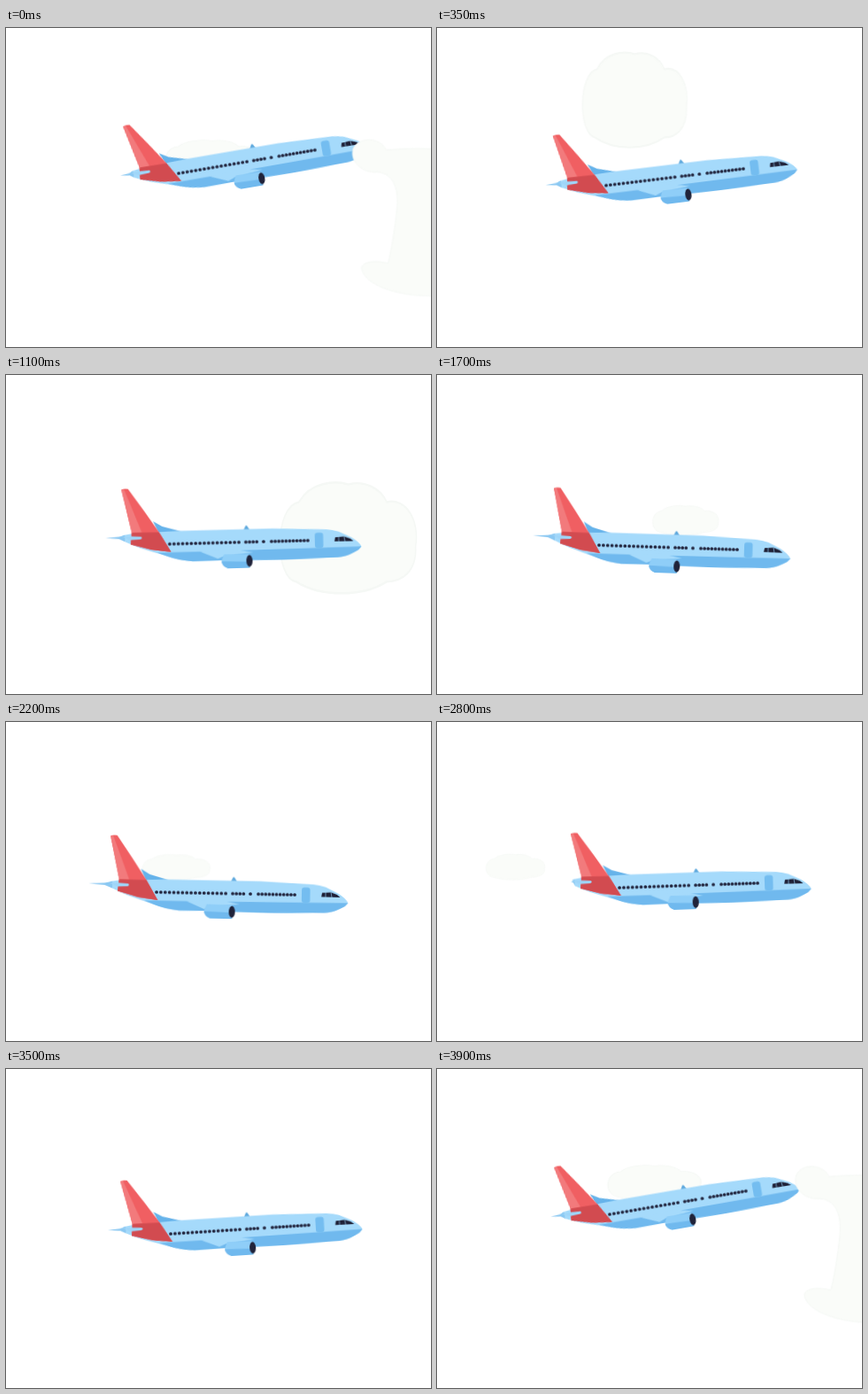
An HTML page that plays this animation: 480 px wide and 360 px high, repeating every 3.95 s.

```html
<!DOCTYPE html>
<html lang="en">
<head>
<meta charset="utf-8">
<title>Airliner in the clouds</title>
<style>
html, body { margin: 0; width: 100%; height: 100%; overflow: hidden; background: #fff; }
svg { display: block; width: 100vw; height: 100vh; }

.move { animation: 3.95s linear infinite; transform-origin: 0 0; }
.cloud { fill: #fafcf9; stroke: #f5f8f5; stroke-width: 1; }
.cloud * { vector-effect: non-scaling-stroke; }

/* The plane turns about its first passenger window. */
#plane { animation-name: fly; }
@keyframes fly {
  0%     { transform: translate(195px, 164px) rotate(-9.7deg); animation-timing-function: ease-in-out; }
  16.46% { transform: translate(188px, 188px) rotate(-4.8deg); }
  29.11% { transform: translate(184.5px, 191px) rotate(-1.1deg); animation-timing-function: ease-out; }
  43.04% { transform: translate(183px, 192px) rotate(1.85deg); animation-timing-function: ease-in-out; }
  55.7%  { transform: translate(170px, 192px) rotate(1.1deg); animation-timing-function: ease-in; }
  69.62% { transform: translate(196.5px, 187.5px) rotate(-1.5deg); }
  70.89% { transform: translate(206px, 187px) rotate(-1.9deg); animation-timing-function: ease-out; }
  77.22% { transform: translate(224px, 186.5px) rotate(-2.4deg); animation-timing-function: ease-in-out; }
  88.61% { transform: translate(186px, 186px) rotate(-3.6deg); animation-timing-function: ease-in-out; }
  98.73%, 100% { transform: translate(195px, 164px) rotate(-9.7deg); }
}

/* The near engine shifts a little against the fuselage. */
#engine { animation-name: engine; }
@keyframes engine {
  0%     { transform: translate(3px, .3px); }
  16.46% { transform: translate(2px, .3px); }
  43.04% { transform: translate(0, 0); }
  55.7%  { transform: translate(-3px, -.5px); }
  70.89% { transform: translate(-3px, -2px); }
  88.61%, 100% { transform: translate(3px, .3px); }
}

#spike { animation-name: spike; }
@keyframes spike {
  0%     { transform: translateX(-50px) scaleX(.62); }
  16.46% { transform: translateX(-50px) scaleX(.8); }
  43.04% { transform: translateX(-50px) scaleX(1); }
  55.7%  { transform: translateX(-50px) scaleX(1.08); }
  70.89% { transform: translateX(-50px) scaleX(.18); }
  88.61% { transform: translateX(-50px) scaleX(.83); }
  100%   { transform: translateX(-50px) scaleX(.62); }
}

#bank { animation-name: bank; }
@keyframes bank {
  0%     { transform: translate(480px, 215px) scale(1); }
  6.33%  { transform: translate(320px, 90px) scale(.7); visibility: visible; }
  6.34%, 91.13% { transform: translate(640px, 60px) scale(1); visibility: hidden; }
  91.14% { transform: translate(590px, 120px) scale(1); visibility: visible; }
  98.73% { transform: translate(493px, 198px) scale(1); }
  100%   { transform: translate(480px, 215px) scale(1); }
}

#puff { animation-name: puff; }
@keyframes puff {
  0%, 6.33% { transform: translate(320px, 90px) scale(0); }
  6.34%  { transform: translate(300px, 80px) scale(1.25, 2.3); }
  12.66% { transform: translate(110px, 82px) scale(1.1, 1.9); }
  15.19% { transform: translate(128px, 107px) scale(.72, .92); }
  16.46% { transform: translate(129px, 107px) scale(.5, .72); }
  18.99%, 100% { transform: translate(129px, 107px) scale(0); }
}

#haze { animation-name: haze; }
@keyframes haze {
  0%     { transform: translate(233px, 146px) scale(1.06, .8); }
  2.53%  { transform: translate(209px, 180px) scale(.8, .6); }
  3.8%, 94.93% { transform: translate(209px, 180px) scale(0); }
  94.94% { transform: translate(278px, 86px) scale(1.06, .8); }
  98.73% { transform: translate(246px, 128px) scale(1.06, .8); }
  100%   { transform: translate(233px, 146px) scale(1.06, .8); }
}

#drift { animation-name: drift; }
@keyframes drift {
  0%, 18.99% { transform: translate(400px, 180px) scale(0); }
  21.5%  { transform: translate(400px, 180px) scale(1.4, 3.5); }
  29.11% { transform: translate(384px, 184px) scale(1.58, 2.3); }
  43.04% { transform: translate(281px, 164px) scale(.75, .67); }
  55.7%  { transform: translate(192.5px, 164px) scale(.77, .58); }
  69.62% { transform: translate(100px, 163.5px) scale(.69, .58); }
  70.89% { transform: translate(89px, 163.5px) scale(.67, .58); }
  81%    { transform: translate(-50px, 160px) scale(.67, .58); }
  81.1%, 100% { transform: translate(-50px, 160px) scale(0); }
}
</style>
</head>
<body>
<svg viewBox="0 0 480 360">
  <defs>
    <path id="cumulus" d="M-38 20C-54 18-54-14-36-16C-28-25-10-26 0-24C12-26 24-22 28-16C42-18 52-8 49 4C50 16 38 20 28 20C10 27-20 27-38 20Z"/>
  </defs>

  <g class="cloud">
    <use id="haze" class="move" href="#cumulus"/>
    <use id="drift" class="move" href="#cumulus"/>
  </g>

  <g id="plane" class="move">
    <!-- far wing tip and dorsal fin -->
    <path fill="#5fa9dd" d="M84-14L86-18Q87-19.5 88-18L90.5-14Z"/>
    <path fill="#66b3ea" d="M-18-26L-8-20L13-14L-12-12Z"/>

    <!-- fuselage -->
    <path fill="#a5dafb" d="M-53-11L-42-12.7L10.5-14.4L116.6-14.5L177-12Q184-11.6 191-9.2L205-2.5Q214 3 216.5 8.2Q214 12 208.7 14.3Q199 19.5 189.8 19.8L127.8 20.9L58.7 20.1L25.7 20.2Q10 19 -2.5 14.1L-33 4.1L-50-3.5Z"/>
    <path fill="#70b9ee" d="M-14 9.5L36 9.5L52 14L62 9.5L110 9L216.5 8.2Q214 12 208.7 14.3Q199 19.5 189.8 19.8L127.8 20.9L58.7 20.1L25.7 20.2Q10 19-2.5 14.1Z"/>
    <path fill="#a5dafb" d="M34 9.5L70 7L94 12L62 15L54 18Z"/>

    <!-- tail -->
    <path id="spike" class="move" fill="#8bc8f2" d="M0-11.3L-8-9.6L-25-8.6L-8-7L0-3.5Z"/>
    <path fill="#f05f62" d="M-53-62.5Q-51-64-45.5-63.3L-28-38L-11.6-13.6L1.5 9L-20.8 6L-44-.6L-42.5-13.7Z"/>
    <path fill="#f27a7c" d="M-53-62.5L-50-63L-31-13.6L-42.5-13.7Z"/>
    <path fill="#d24b50" d="M-42.5-13.7L-11.6-13.6L1.5 9L-20.8 6L-44-.6Z"/>
    <path fill="#9fd5f8" d="M-53-9.5L-44-9.8L-32-9Q-30-7-33-6L-45-5.6Z"/>

    <g id="engine" class="move">
      <path fill="#8fcef8" d="M60 13L88 13.6Q92 21 88.5 29L64 29Q57 26 57 20Z"/>
      <path fill="#70b9ee" d="M57 21L89 22L88.5 29L64 29Q57 26 57 21Z"/>
      <ellipse cx="88.5" cy="21.2" rx="3.5" ry="6.6" fill="#20233a"/>
    </g>

    <!-- passenger windows -->
    <g fill="none" stroke="#22263f" stroke-width="3.7" stroke-linecap="round">
      <path stroke-dasharray=".1 4.78" d="M0 0H79"/>
      <path stroke-dasharray=".1 4" d="M86 0H99"/>
      <path d="M106 0H106.1"/>
      <path stroke-dasharray=".1 4" d="M115 0H157"/>
    </g>

    <!-- door and cockpit -->
    <rect x="164" y="-8.5" width="9.5" height="17.5" rx="3" fill="#74bdf0"/>
    <path fill="#1e2036" d="M187-2.8L197-3.4Q203-2 207.5 2L186.2 1.8Z"/>
    <path stroke="#8fc5ea" stroke-width=".7" d="M191-3.2V2M197-3.6L198 2"/>
  </g>

  <g class="cloud">
    <path id="bank" class="move" d="M-50-77C-56-91-80-93-87-79C-92-65-78-50-60-52C-40-50-36-30-38-10C-40 10-44 35-48 51C-62 47-78 49-78 57C-75 75-40 88 0 88C80 88 90 35 90-5C90-65 40-85-50-77Z"/>
    <use id="puff" class="move" href="#cumulus"/>
  </g>
</svg>
</body>
</html>
```
